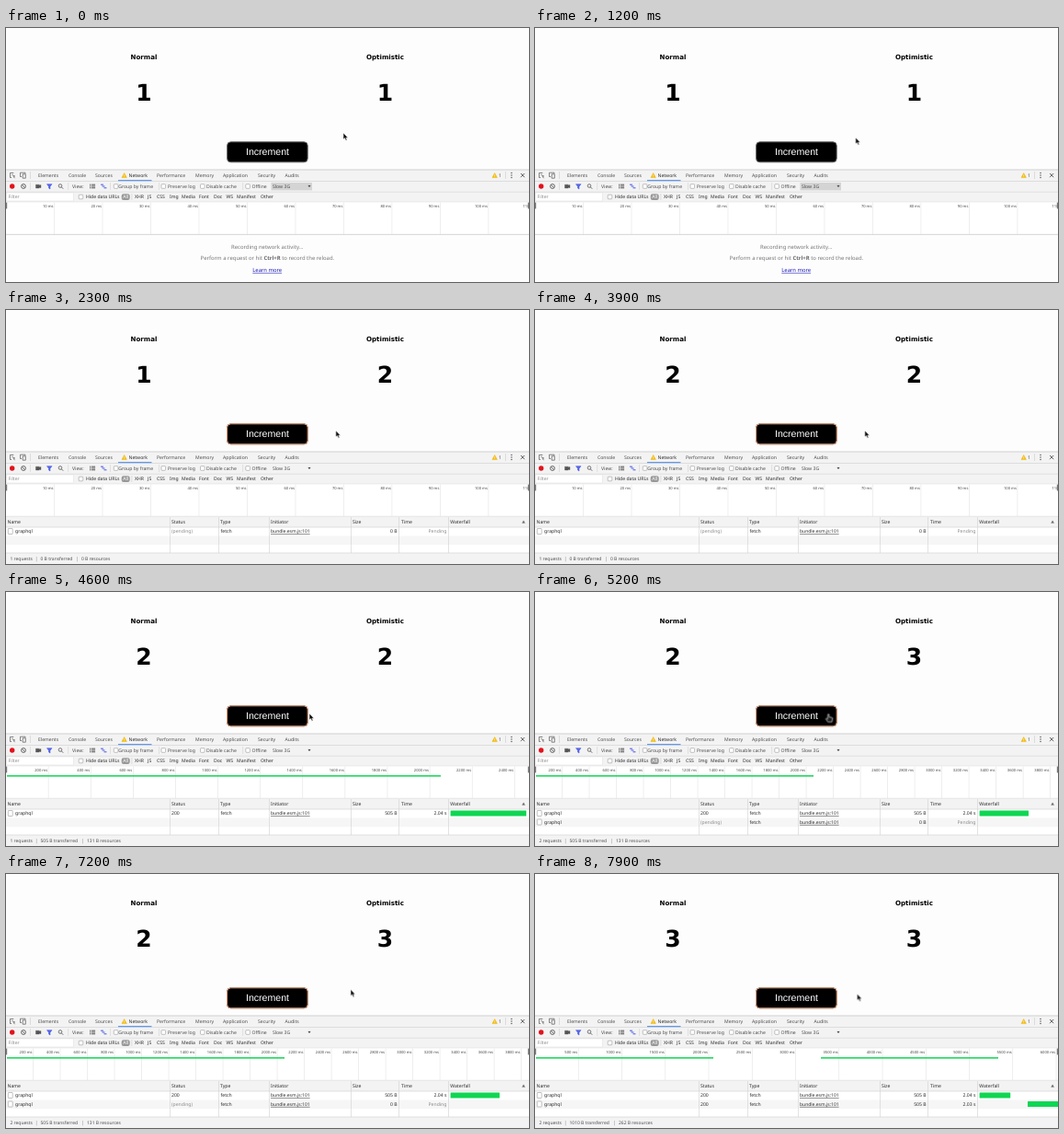
An HTML page for the animation above (8 s loop, 569 by 276 pixels).

```html
<!DOCTYPE html>
<html lang="en">
<head>
<meta charset="utf-8">
<title>Normal and optimistic updates</title>
<style>
html, body { margin: 0; width: 100%; height: 100%; overflow: hidden; background: #fefdfe; }
svg { display: block; width: 569px; height: 276px; }
text { font: 5.12px "Noto Sans", "Open Sans", sans-serif; fill: #4c4c4c; text-rendering: geometricPrecision; white-space: pre; }
.head { font: bold 7.1px "DejaVu Sans", sans-serif; fill: #000; text-anchor: middle; }
.num { font: bold 25px "DejaVu Sans", sans-serif; fill: #000; text-anchor: middle; }
.btn { font: 10.6px "Liberation Sans", Arial, sans-serif; fill: #fff; text-anchor: middle; }
.dark { fill: #2b2b2b; }
.pale { fill: #8c8c8c; }
.white { fill: #fff; }
.hint { font-size: 5.95px; fill: #777; text-anchor: middle; }
.hint tspan { font-weight: bold; fill: #666; }
.learn { font-size: 5.87px; fill: #1a1ab8; text-anchor: middle; text-decoration: underline; }
.tick { font-size: 4.1px; fill: #444; text-anchor: end; }
.end { text-anchor: end; }
.link { font-size: 5px; fill: #2b2b2b; text-decoration: underline; }
.foot { font-size: 4.97px; }
.span { animation: 8s step-end infinite; }
.pointer { animation: move 8s step-end infinite; }
@keyframes move {
  0% { transform: translate(367px, 114px); }
  2.5% { transform: translate(366.4px, 114px); }
  12.5% { transform: translate(366.4px, 114px); animation-timing-function: steps(4); }
  17.5% { transform: translate(331px, 124px); animation-timing-function: steps(4); }
  22.5% { transform: translate(306.5px, 131px); }
  23.75% { transform: translate(306.5px, 131px); animation-timing-function: steps(4); }
  28.75% { transform: translate(358.8px, 131px); }
  52.5% { transform: translate(358.8px, 131px); animation-timing-function: steps(4); }
  57.5% { transform: translate(330px, 132px); animation-timing-function: steps(4); }
  62.5% { transform: translate(319.3px, 132.5px); }
  65% { transform: translate(319.3px, 132.5px); animation-timing-function: steps(5); }
  71.25% { transform: translate(375px, 125.5px); }
  96.25% { transform: translate(375px, 125.5px); animation-timing-function: steps(2); }
  98.75%, 100% { transform: translate(350.5px, 130.3px); }
}
</style>
</head>
<body>
<script>
const LOOP = 8000, W = 569;
const SELECT = 1800, CLICK1 = 1900, NORMAL1 = 3900, DONE1 = 4000;
const CLICK2 = 5200, NORMAL2 = 7300, DONE2 = 7400;
const GREEN = '#0fd653';
let rules = '';

const text = (x, y, s, cls = '') => `<text x="${x}" y="${y}" class="${cls}">${s}</text>`;
const rect = (x, y, w, h, fill, more = '') =>
  `<rect x="${x}" y="${y}" width="${w}" height="${h}" fill="${fill}" ${more}/>`;
const path = (d, stroke, width = 0.7, fill = 'none') =>
  `<path d="${d}" fill="${fill}" stroke="${stroke}" stroke-width="${width}"/>`;
const box = (x, y) => rect(x, y, 4.6, 4.6, '#fff', 'rx=".8" stroke="#999" stroke-width=".6"');
const labels = (y, list, cls) => list.map(([x, s]) => text(x, y, s, cls)).join('');

// Shows its content only from one time to another, in ms
function span(from, to, content) {
  const name = `s${from}_${to}`;
  const pc = t => t / LOOP * 100 + '%';
  rules += `@keyframes ${name}{0%{opacity:${from ? 0 : 1}}`
    + (from ? `${pc(from)}{opacity:1}` : '')
    + `${pc(to)}{opacity:${to < LOOP ? 0 : 1}}100%{opacity:${to < LOOP ? 0 : 1}}}`;
  return `<g class="span" style="animation-name:${name}">${content}</g>`;
}

function counter(x, title, t2, t3) {
  const n = s => text(x, 79, s, 'num');
  return text(x, 33.7, title, 'head')
    + span(0, t2, n(1)) + span(t2, t3, n(2)) + span(t3, LOOP, n(3));
}

function button() {
  const frame = stroke => rect(240.6, 123.8, 87.6, 22, '#000', `rx="4" stroke="${stroke}" stroke-width="1"`);
  return frame('#666') + span(SELECT, LOOP, frame('#e9a47c')) + text(284.5, 138.2, 'Increment', 'btn');
}

const warning = x => path(`M${x} 162.6L${x + 2.7} 157.6L${x + 5.4} 162.6Z`, '#e9ac00', 0.4, '#f6bd00')
  + path(`M${x + 2.7} 159.2v1.7m0 .5v.7`, '#fff', 0.6);

function toolbars() {
  let s = rect(0, 154, W, 35, '#f3f3f3') + rect(0, 153.6, W, 0.8, '#c6c6c6');
  for (const y of [166, 177.8, 188.8]) s += rect(0, y, W, 0.6, '#cfcfcf');
  // tabs
  s += path('M8 158V157.5H4.5V162.5H6M6.3 159.3L9.6 161L8.2 161.5L9.5 163.2', '#555')
    + path('M17 161.5H15.5V157.2H21V158.3M18.2 158.8H21.3V163.2H18.2Z', '#555')
    + rect(26, 156, 0.6, 8, '#ccc') + rect(122, 165.2, 36.5, 1, '#4285e8') + warning(126);
  s += labels(162, [[35, 'Elements'], [68, 'Console'], [97, 'Sources'], [164, 'Performance'],
    [206, 'Memory'], [236, 'Application'], [274, 'Security'], [303.5, 'Audits']])
    + text(133.5, 162, 'Network', 'dark');
  s += warning(529) + text(536, 162, '1') + rect(543, 156, 0.6, 8, '#ccc');
  for (const y of [157.6, 160, 162.4]) s += `<circle cx="550" cy="${y}" r=".75" fill="#555"/>`;
  s += path('M560 158L564.2 162.2M564.2 158L560 162.2', '#555', 0.9);
  // controls
  s += '<circle cx="6.7" cy="172" r="2.7" fill="#e3101c"/>'
    + '<circle cx="19" cy="172" r="2.4" fill="none" stroke="#555" stroke-width=".9"/>'
    + path('M17.3 170.3L20.7 173.7', '#555', 0.8)
    + path('M32.5 170.2H36.3V171.3L38 170.4V173.8L36.3 172.9V174H32.5Z', '#555', 0.4, '#555')
    + path('M44.5 169.7H50L48 172.2V175L46.5 174V172.2Z', '#3c4fe0', 0.5, '#5868ea')
    + '<circle cx="59" cy="171.5" r="1.8" fill="none" stroke="#555" stroke-width=".8"/>'
    + path('M60.3 172.8L62.2 174.7', '#555', 0.9)
    + path('M91 170.2h1.4m.7 0h4M91 172h1.4m.7 0h4M91 173.8h1.4m.7 0h4', '#555', 1)
    + path('M103 170.2h3M104.5 172h3M106.5 173.8h3', '#4456e4', 1);
  for (const x of [26, 67.5, 113, 166, 257.5]) s += rect(x, 168, 0.6, 8, '#d2d2d2');
  for (const x of [117.3, 169, 211.5, 260.8]) s += box(x, 169.7);
  s += span(0, SELECT, rect(288.5, 168, 44.5, 8.4, '#d4d4d4'));
  s += labels(174, [[72, 'View:'], [122.3, 'Group by frame'], [176, 'Preserve log'],
    [218, 'Disable cache'], [267.5, 'Offline'], [290, 'Slow 3G']])
    + path('M328.7 171H331.3L330 173Z', '#444', 0.2, '#444');
  // filters
  s += rect(0.5, 179, 73, 9, '#fff', 'stroke="#ddd" stroke-width=".5"') + text(2.5, 185.4, 'Filter', 'pale')
    + box(79.2, 181.2) + rect(125.7, 180.3, 9, 6.6, '#999', 'rx="2.2"') + text(127.2, 185.4, 'All', 'white')
    + rect(136.6, 180, 0.6, 7, '#ccc');
  return s + labels(185.4, [[87, 'Hide data URLs'], [140, 'XHR'], [154, 'JS'], [164, 'CSS'], [178, 'Img'],
    [191, 'Media'], [210, 'Font'], [226, 'Doc'], [239.5, 'WS'], [251, 'Manifest'], [277, 'Other']], 'dark');
}

// Overview strip; total and step in ms, bars as [start, end] in px
function overview(total, step, bars = []) {
  const gap = step / total * W;
  let s = rect(0, 189.4, W, 34.8, '#fff');
  for (let k = 1; k * gap < W + 12; k++)
    s += rect(k * gap - 0.3, 189.4, 0.6, 34.8, '#e3e3e3') + text(k * gap - 1, 194.9, k * step + ' ms', 'tick');
  for (const [a, b] of bars) s += rect(a, 199.1, b - a, 1.5, GREEN);
  return s + rect(0, 189.6, 1.2, 6.8, '#777') + rect(W - 1.2, 189.6, 1.2, 6.8, '#777')
    + rect(0, 223.9, W, 0.7, '#c4c4c4');
}

const blank = text(284.3, 240.2, 'Recording network activity…', 'hint')
  + text(284.4, 252.4, 'Perform a request or hit <tspan>Ctrl+R</tspan> to record the reload.', 'hint')
  + text(284.2, 264.9, 'Learn more', 'learn');

// A row is [time] when finished, with its bar [x, width], or empty while pending
function table(rows, sums) {
  let s = rect(0, 224.6, W, 51.4, '#fff') + rect(0, 225, W, 11, '#f3f3f3') + rect(0, 235.7, W, 0.6, '#cdcdcd')
    + rect(0, 245.6, W, 9.5, '#f6f6f6');
  for (const x of [178.3, 231.3, 286, 375, 427.4, 481.3]) s += rect(x, 225, 0.6, 39, '#d0d0d0');
  s += labels(232.3, [[1.5, 'Name'], [180, 'Status'], [233, 'Type'], [288, 'Initiator'],
    [377, 'Size'], [430, 'Time'], [483.3, 'Waterfall']], 'dark')
    + path('M561.5 231.6H564.7L563.1 228.8Z', '#666', 0.2, '#666');
  rows.forEach(([time, x, w], i) => {
    const y = 242.4 + i * 9.5;
    s += rect(2.3, y - 4.9, 4.9, 6, '#fff', 'rx=".5" stroke="#999" stroke-width=".6"')
      + text(10, y, 'graphql', 'dark') + text(180, y, time ? '200' : '(pending)', time ? 'dark' : 'pale')
      + text(233.5, y, 'fetch', 'dark') + text(288, y, 'bundle.esm.js:101', 'link')
      + text(425.6, y, time ? '505 B' : '0 B', 'dark end')
      + text(479.4, y, time || 'Pending', (time ? 'dark' : 'pale') + ' end');
    if (time) s += rect(x, y - 4.8, w, 5.8, GREEN, 'rx=".5"');
  });
  s += rect(0, 264, W, 12, '#f3f3f3') + rect(0, 263.7, W, 0.6, '#cdcdcd');
  sums.forEach(([x, label], i) => {
    s += text(x, 272.4, label, 'foot');
    if (i) s += rect(x - 4.6, 268, 0.6, 5.4, '#aaa');
  });
  return s;
}

const first = [['2.04 s', 483.6, 53.4], []];
const network = span(0, CLICK1, blank)
  + span(CLICK1, DONE1, table([[]], [[4.5, '1 requests'], [37.5, '0 B transferred'], [82, '0 B resources']]))
  + span(DONE1, CLICK2, table([['2.04 s', 483.6, 82.5]],
    [[4.5, '1 requests'], [37.5, '505 B transferred'], [88, '131 B resources']]))
  + span(CLICK2, DONE2, table(first, [[4.5, '2 requests'], [37.5, '505 B transferred'], [88, '131 B resources']]))
  + span(DONE2, LOOP, table([['2.04 s', 483.6, 33.6], ['2.03 s', 536, 33]],
    [[4.5, '2 requests'], [37.5, '1010 B transferred'], [91, '262 B resources']]));

const strip = span(0, DONE1, overview(108.4, 10))
  + span(DONE1, CLICK2, overview(2468, 200, [[1, 473]]))
  + span(CLICK2, DONE2, overview(3857, 200, [[1, 303]]))
  + span(DONE2, LOOP, overview(6021, 500, [[1, 194], [311, 504]]));

const arrow = path('M0 0V7L1.6 5.6L2.8 8.2L4 7.6L2.9 5.2H5Z', '#fff', 0.5, '#111');
const hand = path('M-.8 .6Q0 -.6 .8 .6V3.4L4 4Q4.7 4.2 4.5 5L3.8 8.8H-.6L-3 5.4Q-2.6 4.3 -1.4 5.2L-.8 5.7Z',
  '#ddd', 0.7, '#222');
const pointer = `<g class="pointer">`
  + [[0, 1500], [2100, 4700], [5300, LOOP]].map(([a, b]) => span(a, b, arrow)).join('')
  + [[1500, 2100], [4700, 5300]].map(([a, b]) => span(a, b, hand)).join('') + '</g>';

const art = rect(0, 0, W, 276, '#fefdfe')
  + counter(150, 'Normal', NORMAL1, NORMAL2) + counter(412.5, 'Optimistic', CLICK1, CLICK2)
  + button() + toolbars() + strip + network + pointer;
document.body.innerHTML = `<style>${rules}</style><svg viewBox="0 0 569 276">${art}</svg>`;
</script>
</body>
</html>
```
